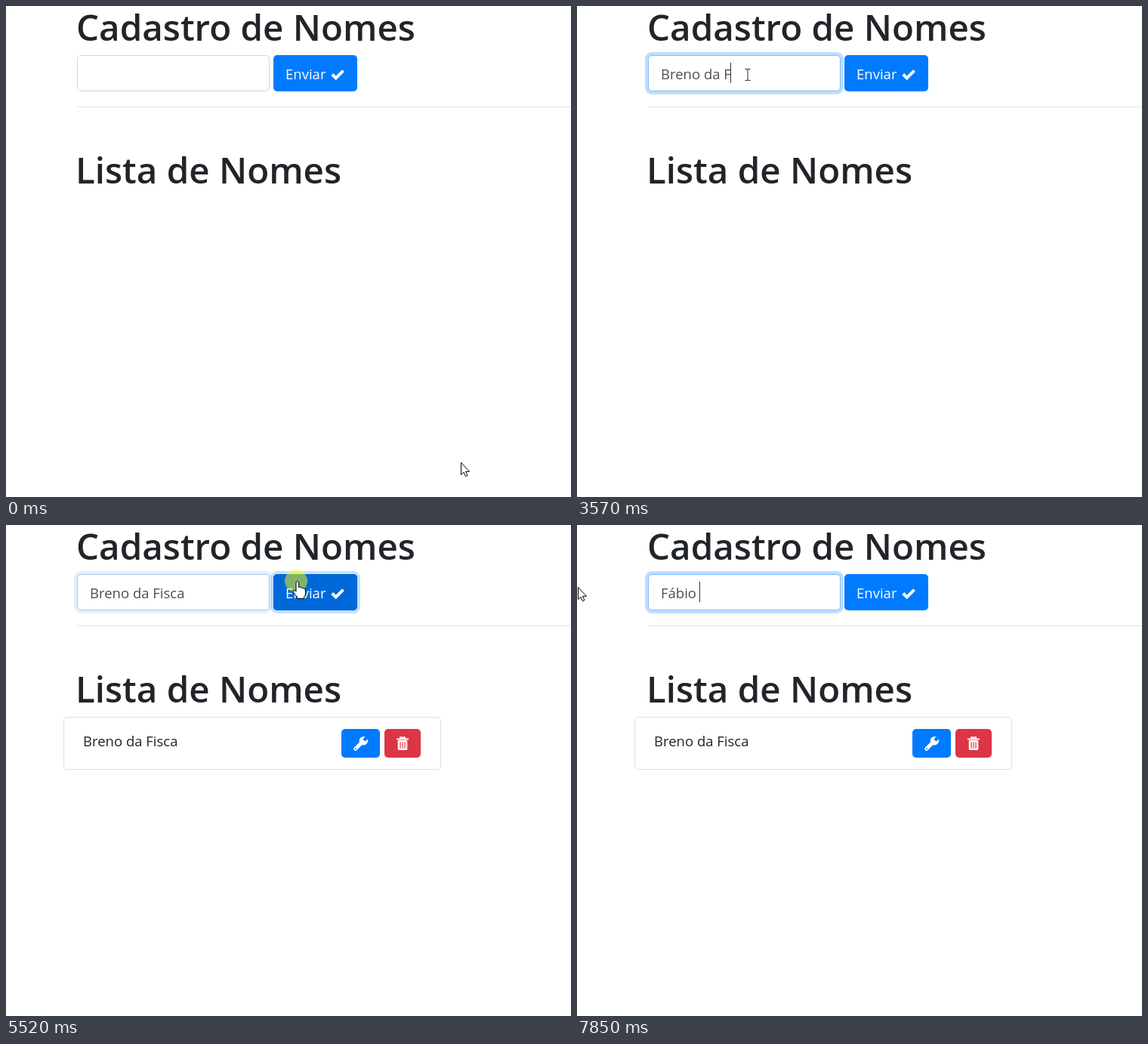
An HTML page for the animation above (8000 ms loop, 748 by 650 pixels).

```html
<!DOCTYPE html>
<html lang="pt-BR">
<head>
<meta charset="utf-8">
<title>Cadastro de Nomes</title>
<style>
  html, body { margin: 0; width: 100%; height: 100%; overflow: hidden; background: #fff; }
  svg { display: block; }
  text { font: 18.5px "Open Sans", "Noto Sans", sans-serif; white-space: pre; fill: #212529; }
  .title { font-size: 47.5px; font-weight: 600; }
  .primary { fill: #007bff; }
  .white { fill: #fff; }
  .line { fill: none; stroke: #fff; }
</style>
</head>
<body>
<svg width="748" height="650">
  <text class="title" x="93" y="46">Cadastro de Nomes</text>
  <text class="title" x="92" y="235">Lista de Nomes</text>
  <path d="M94 133.5H748" stroke="#e5e5e5"/>

  <rect id="inputRing" x="90" y="61" width="263" height="56" rx="9" fill="#bfdeff"/>
  <rect x="94.5" y="65.5" width="254" height="47" rx="4.5" fill="#fff" stroke="#ced4da"/>
  <rect id="inputBorder" x="94.5" y="65.5" width="254" height="47" rx="4.5" fill="none" stroke="#80bdff"/>
  <rect id="selection" y="75" height="27" fill="#3390ff"/>
  <text id="field" x="111" y="97"><tspan id="plain" fill="#495057"></tspan><tspan id="picked" fill="#fff"></tspan></text>
  <rect id="caret" y="75" width="1" height="27" fill="#333"/>

  <rect id="buttonRing" x="350" y="61" width="119" height="56" rx="9" fill="#93c7ff"/>
  <rect class="primary" x="354" y="65" width="111" height="48" rx="5"/>
  <rect id="buttonHover" x="354.5" y="65.5" width="110" height="47" rx="4.5" fill="#0069d9" stroke="#0062cc"/>
  <text class="white" x="370" y="97">Enviar</text>
  <path class="line" d="M431.8 90.5l4.9 4.9 9.8-9.8" stroke-width="4"/>

  <g id="item">
    <rect x="76.5" y="254.5" width="499" height="69" rx="4.5" fill="#fff" stroke="#dfdfdf"/>
    <text id="itemName" x="102" y="293"></text>
    <rect class="primary" x="444" y="270" width="51" height="38" rx="5"/>
    <path class="line" d="M462.7 296.3L472 287" stroke-width="5" stroke-linecap="round"/>
    <circle class="white" cx="473.3" cy="285.7" r="5.7"/>
    <path d="M474 285L480 279" stroke="#007bff" stroke-width="4.4"/>
    <circle class="primary" cx="463" cy="296" r="1"/>
    <rect x="501" y="270" width="48" height="38" rx="5" fill="#dc3545"/>
    <path class="line" d="M517 283.5h16M522 283v-1.7h6v1.7" stroke-width="2"/>
    <rect class="white" x="518.7" y="285" width="12.6" height="13" rx="1.7"/>
    <path d="M522 287.3v8.4m3 0v-8.4m3 0v8.4" stroke="#dc3545" stroke-width="1.2"/>
  </g>

  <g id="pointer">
    <circle id="press" cx="-2" cy="-1" r="15" fill="#ff0" fill-opacity=".5"/>
    <path id="arrow" d="M.5 .5V16.5L4 13.2 6.4 18.7 8.9 17.6 6.5 12.3H11.5Z" fill="#fff" stroke="#000"/>
    <path id="beam" d="M-3.5-7.5H-1Q0-7.5 0-6.5Q0-7.5 1-7.5H3.5M0-6.5V6.5M-3.5 7.5H-1Q0 7.5 0 6.5Q0 7.5 1 7.5H3.5" fill="none" stroke="#222"/>
    <path id="hand" d="M-2 13V1.5A1.8 1.8 0 0 1 1.6 1.5V7.5Q4.5 6 5 8.3Q7.5 7.3 8.2 9.3Q10.5 8.8 10.5 11V15Q10.5 19 8.5 20.5V22.5H-.5V20.5Q-3 17.5-5.8 13.5Q-6-.1 11-3.5 11.7Z" fill="#fff" stroke="#000"/>
  </g>
</svg>
<script>
const LOOP = 8000, FRAME = 76, BLINK = 540;
const NAME = "Breno da Fisca", NEXT_NAME = "Fábio ";
const NAME_KEYS = [1540, 2240, 2460, 2630, 2780, 2950, 3100, 3180, 3250, 3570, 4120, 4270, 4420, 4500];
const NEXT_KEYS = [7070, 7460, 7540, 7610, 7760, 7850];
const FOCUS = 608, SEND = 5440, DRAG = 6130, DRAG_END = 6440;

// time, x, y of the pointer
const PATH = [
  [0, 602, 604], [532, 226, 91], [4800, 226, 91], [5016, 340, 52], [5244, 386, 75],
  [5560, 386, 75], [5928, 259, 87], [6080, 259, 87], [6384, 1, 82]
];

const el = {};
document.querySelectorAll("[id]").forEach(node => el[node.id] = node);
el.hand.setAttribute("d", "M-2 13V1.5A1.8 1.8 0 0 1 1.6 1.5V7.5Q4.5 6 5 8.3Q7.5 7.3 8.2 9.3Q10.5 8.8 10.5 11V15Q10.5 19 8.5 20.5V22.5H-.5V20.5Q-3 17.5-5.8 13.5Q-6 11-3.5 11.7Z");
el.itemName.textContent = NAME;

const clamp = v => Math.max(0, Math.min(1, v));
const within = (t, from, to) => t >= from && t < to;
const fade = (t, on, off) => clamp((t - on) / 150) - clamp((t - off) / 150);
const show = (node, visible) => node.style.display = visible ? "" : "none";

function pointerAt(t) {
  const next = PATH.findIndex(p => p[0] > t);
  if (next < 0) return PATH[PATH.length - 1].slice(1);
  const [t0, x0, y0] = PATH[next - 1], [t1, x1, y1] = PATH[next];
  const u = (t - t0) / (t1 - t0), k = u * u * (3 - 2 * u);
  return [x0 + (x1 - x0) * k, y0 + (y1 - y0) * k];
}

function drawPointer(t) {
  const [x, y] = pointerAt(Math.floor((t + 6) / FRAME) * FRAME);
  const dragging = within(t, DRAG, DRAG_END);
  const inRow = y > 65 && y < 113;
  const shape = dragging || inRow && x > 94 && x < 349 ? "beam"
    : inRow && x > 354 && x < 465 ? "hand" : "arrow";
  for (const id of ["arrow", "beam", "hand"]) show(el[id], id === shape);
  show(el.press, within(t, FOCUS, 760) || within(t, SEND, 5590) || dragging);
  el.pointer.setAttribute("transform", `translate(${Math.round(x)} ${Math.round(y)})`);
  return x;
}

function drawField(t, pointerX) {
  const replaced = t >= NEXT_KEYS[0];
  const keys = replaced ? NEXT_KEYS : NAME_KEYS;
  const count = keys.filter(k => k <= t).length;
  const value = (replaced ? NEXT_NAME : NAME).slice(0, count);
  el.plain.textContent = value;
  el.picked.textContent = "";
  const end = 111 + (count ? el.field.getComputedTextLength() : 0);

  let split = count, start = end;
  if (t >= DRAG && !replaced) {
    split = 0;
    while (split < count && el.field.getStartPositionOfChar(split).x < pointerX - 5) split++;
    if (split < count) start = el.field.getStartPositionOfChar(split).x;
  }
  el.plain.textContent = value.slice(0, split);
  el.picked.textContent = value.slice(split);
  el.selection.setAttribute("x", start);
  el.selection.setAttribute("width", end - start);

  const resets = [670, ...NAME_KEYS, DRAG, ...NEXT_KEYS].filter(k => k <= t);
  const focused = within(t, 670, SEND) || t >= DRAG;
  const lit = Math.floor((t - resets[resets.length - 1]) / BLINK) % 2 === 0;
  show(el.caret, focused && lit && split === count);
  el.caret.setAttribute("x", Math.round(end) - 1);
}

function draw() {
  const t = performance.now() % LOOP;
  const inputFocus = fade(t, FOCUS, SEND) + fade(t, DRAG, LOOP * 2);
  el.inputRing.style.opacity = el.inputBorder.style.opacity = inputFocus;
  el.buttonRing.style.opacity = fade(t, SEND, DRAG);
  el.buttonHover.style.opacity = fade(t, 5130, DRAG);
  show(el.item, t >= 5520);
  drawField(t, drawPointer(t));
  requestAnimationFrame(draw);
}
draw();
</script>
</body>
</html>
```
